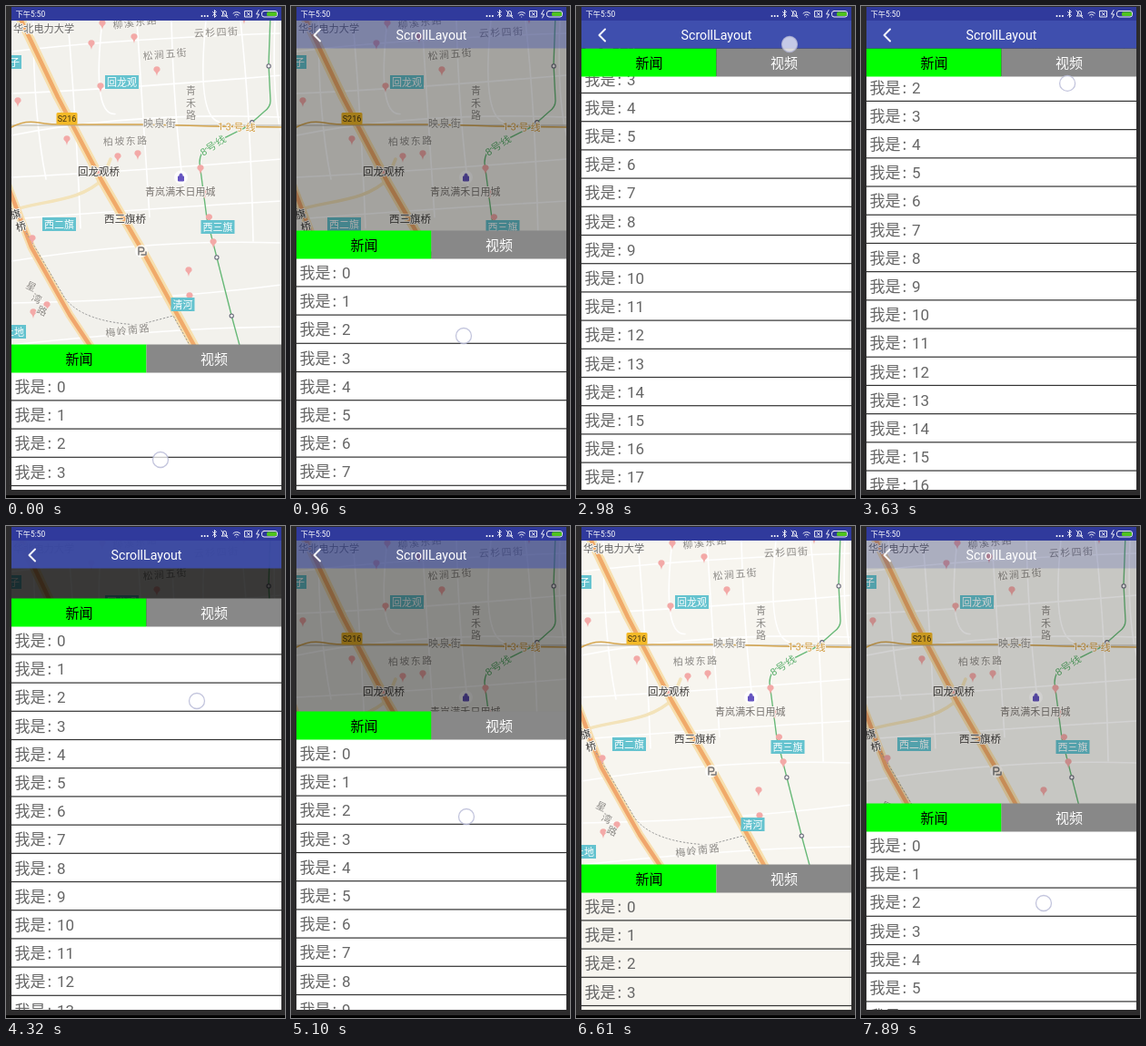
An HTML page that plays this animation: 307x540 px, repeating every 8 s.

```html
<!DOCTYPE html>
<html lang="zh-CN">
<head>
<meta charset="utf-8">
<title>ScrollLayout</title>
<style>
html, body { margin: 0; width: 100%; height: 100%; overflow: hidden; background: #2c2b2c; }
svg { display: block; position: absolute; left: 0; top: 0; }
text { font-family: Roboto, "Noto Sans CJK SC", "Noto Sans CJK", "Noto Sans", sans-serif; }
.line { fill: none; stroke-linecap: round; stroke-linejoin: round; }
.mid { text-anchor: middle; }
.street { font-size: 11px; fill: #8c8a86; letter-spacing: 1.4px; }
.place { font-size: 11.5px; fill: #3c3a38; }
.halo { paint-order: stroke; stroke: #f7f5f0; stroke-width: 2px; stroke-linejoin: round; }
.item { font-size: 17px; fill: #666; }
.colon { font-family: "Noto Sans CJK SC", "Noto Sans CJK", sans-serif; }
.tab { font-size: 15px; text-anchor: middle; }
</style>
</head>
<body>
<svg width="307" height="540" viewBox="0 0 307 540">
  <defs>
    <clipPath id="screen"><rect x="6" y="1" width="297" height="530"/></clipPath>
    <path id="pin" d="M0 5C-1-.5-3.6 0-3.6-2.2A3.6 3.6 0 0 1 3.6-2.2C3.6 0 1-.5 0 5Z" fill="#f3a9a7"/>
    <path id="highway" d="M13 8L57 100 106 193 152 272 210 378"/>
    <path id="ramp" d="M2 197L28 265 70 339 96 378"/>
  </defs>
  <rect y="537" width="307" height="3"/>
  <g clip-path="url(#screen)">
    <rect id="ground" x="6" width="297" height="531"/>
    <g class="line" id="roads" stroke="#fff" stroke-width="1.6"></g>
    <g class="line">
      <path d="M2 226C35 213 82 216 106 190L115 168" stroke="#f3e3ba" stroke-width="3.5"/>
      <use href="#ramp" stroke="#f7dfb0" stroke-width="9"/>
      <use href="#ramp" stroke="#f0a66d" stroke-width="4.5"/>
      <use href="#highway" stroke="#f7dfae" stroke-width="10"/>
      <use href="#highway" stroke="#f0aa6a" stroke-width="4.5"/>
      <path d="M6 131H303" stroke="#b5b1a8" stroke-width="1.2"/>
      <path d="M6 133Q20 125 36 128T85 130H163L225 132 303 133" stroke="#d5a650" stroke-width="1.6"/>
      <path id="metro" d="M291 8L289 64 291 104Q291 111 284 116L266 132 226 152Q213 159 213 172L221 233 249 343 258 376" stroke="#68b978" stroke-width="1.4"/>
      <path d="M6 222L29 260 65 321Q85 347 146 350L184 340 202 372" stroke="#999" stroke-width="1" stroke-dasharray="1.5 2.5"/>
    </g>
    <g id="marks"></g>
    <rect x="55.500" y="117" width="23" height="13" rx="1.500" fill="#f3b927"/>
    <text class="mid" x="67" y="127" font-size="9" fill="#443414">S216</text>
    <circle cx="192.500" cy="188" r="7.500" fill="#fff" opacity=".8"/>
    <path d="M189.500 187h6v5h-6zM191 187v-1.500a1.500 1.500 0 0 1 3 0v1.500" fill="#6554c0" stroke="#6554c0"/>
    <circle cx="149" cy="269" r="7" fill="#fff" opacity=".8"/>
    <path class="line" d="M146 273v-8h3.500a2 2 0 0 1 0 4.500H146M149 273h5v-3" stroke="#777" stroke-width="1.500"/>
    <rect id="dim" x="6" y="16" width="297" height="515"/>
    <g id="panel">
      <rect id="sheet" x="6" y="30" width="297" height="540"/>
      <g id="list"></g>
      <rect x="6" y="-.5" width="148.500" height="31" fill="#0f0"/>
      <rect x="154.500" y="-.5" width="148.500" height="31" fill="#888"/>
      <text class="tab" x="80.500" y="21">新闻</text>
      <text class="tab" x="229" y="21" fill="#fff">视频</text>
    </g>
    <rect id="bar" x="6" y="16" width="297" height="30.500" fill="#3f4fae"/>
    <g id="title">
      <path class="line" d="M32 25.500L25.500 32 32 38.500" stroke="#fff" stroke-width="1.900"/>
      <text class="mid" x="154.500" y="37" font-size="14.200" fill="#fff">ScrollLayout</text>
    </g>
    <rect x="6" y="1" width="297" height="15" fill="#303a9c"/>
    <g fill="#fff">
      <text x="10.500" y="12" font-size="8.300">下午5:50</text>
      <path class="line" d="M215.500 11h6.500" stroke="#fff" stroke-width="2" stroke-dasharray="0 3.200"/>
    </g>
    <g class="line" stroke="#fff" stroke-width=".9">
      <path d="M227.500 6.500l4 4-2 2v-8l2 2-4 4M237.500 11h6l-1-1.500V7.500a2 2 0 0 0-4 0v2zM237 5l7 8M250 8a5.500 5.500 0 0 1 7.500 0M251.500 10a3.300 3.300 0 0 1 4.500 0M253.700 12v.1M263 5.500h7.500v6.500H263zM265.300 7.300l3 3m0-3l-3 3M278 4.500l-2.500 4.500h3l-2 4"/>
      <rect x="281.500" y="5.500" width="17" height="6.500" rx="2.500"/>
    </g>
    <rect x="287" y="6.500" width="11" height="4.600" rx="1.500" fill="#4fc31e"/>
    <circle id="touch" r="8.500" fill="#fff" fill-opacity=".7" stroke="#b4b6d4" stroke-opacity=".8" stroke-width="1.300"/>
  </g>
</svg>
<script>
const NS = "http://www.w3.org/2000/svg";
const $ = id => document.getElementById(id);

function add(parent, tag, attrs, text) {
  const el = document.createElementNS(NS, tag);
  for (const k in attrs) el.setAttribute(k, attrs[k]);
  if (text !== undefined) el.textContent = text;
  return parent.appendChild(el);
}
const mark = (tag, attrs, text) => add($("marks"), tag, attrs, text);

// Side streets: a loose, gently bent grid
for (let i = 0; i < 8; i++) {
  const y = 36 + 46 * i, x = 30 + 38 * i, bend = 12 * Math.sin(i * 2.3);
  add($("roads"), "path", { d: `M6 ${y + 14}Q${120 + 8 * i} ${y + bend} 303 ${y - 6}` });
  add($("roads"), "path", { d: `M${x} 16Q${x + bend} 120 ${x + 14} ${190 + 6 * bend}` });
}

// Stations along the metro line
const metro = $("metro");
for (const part of [0.14, 0.31, 0.75, 0.91]) {
  const { x, y } = metro.getPointAtLength(part * metro.getTotalLength());
  mark("circle", { cx: x, cy: y, r: 2.1, fill: "#fff", stroke: "#667", "stroke-width": 1.1 });
}

function pins(x, y, dx, dy, n = 2) {
  for (let i = 0; i < n; i++) mark("use", { href: "#pin", x: x + dx * i, y: y + dy * i });
}
pins(106, 21, 156, -6);
pins(94, 43, 47, -7);
pins(104, 90, 62, -18);
pins(13, 106, 16, 151);
pins(67, 148, 36, 35);
pins(123, 167, 22, -3);
pins(214, 180, 4.7, 27, 4);
pins(201, 292, 1, 28);
pins(30, 338, 15, -8);

function tag(x, y, label) {
  const width = 11 * label.length + 4;
  mark("rect", { x, y, width, height: 15, fill: "#65c3cf" });
  mark("text", { x: x + width / 2, y: y + 11.5, class: "mid", "font-size": 11, fill: "#fff" }, label);
}
tag(109, 76, "回龙观");
tag(40, 232, "西二旗");
tag(214.5, 235, "西三旗");
tag(181.5, 320, "清河");
tag(-9, 54, "庄子");
tag(-4, 350, "上地");

function name(kind, x, y, label, turn = 0, style = "") {
  mark("text", { class: kind + " halo", x, y, transform: `rotate(${turn} ${x} ${y})`, style }, label);
}
function column(kind, x, y, label, dx = 0, turn = 0) {
  [...label].forEach((c, i) => name(kind, x + dx * i, y + 13.5 * i, c, turn));
}
name("place", 8, 29, "华北电力大学", 0, "font-size:11.2px;fill:#666");
name("street", 118, 25, "柳溪东路", -7);
name("street", 207, 34, "云杉四街", -3);
name("street", 151, 59, "松涧五街", -5);
name("street", 151, 133, "映泉街");
name("street", 107, 153, "柏坡东路", -2);
name("street", 110, 363, "梅岭南路", -7);
name("street", 153, 208, "青岚满禾日用城", 0, "letter-spacing:.1px;fill:#77736f");
name("place", 79, 186, "回龙观桥");
name("place", 108, 237.5, "西三旗桥");
name("street", 233, 136, "13号线", 2, "letter-spacing:2.4px;fill:#d19a3c");
name("street", 217, 165, "8号线", -33, "fill:#58ad69");
column("street", 198, 97, "青禾路");
column("street", 21, 309, "星湾路", 6, 25);
column("place", 6, 234, "旗桥", 6, -15);

// List rows
const ROW = 31.2;
for (let i = 0; i < 24; i++) {
  const y = 52 + ROW * i;
  add($("list"), "text", { class: "item", x: 9.5, y }, "我是");
  add($("list"), "text", { class: "item colon", x: 45.5, y }, ":");
  add($("list"), "text", { class: "item", x: 56, y }, i);
  add($("list"), "rect", { x: 6, y: y + 8.3, width: 297, height: 1.2, fill: "#333" });
}

// A finger drags the sheet up, then down, lets go and starts again
const LOOP = 8000, STEP = 135, FIRST = 100, OPEN = 372, TRAVEL = 325;
const REST = [6580, 7350];
const poses = [
  { t: 0, shift: 0, x: 170, y: 498 },
  { t: 930, shift: 125, x: 190, y: 362 },
  { t: 2955, shift: 431, x: 235, y: 42 },
  { t: 3240, shift: 448, x: 237, y: 23 },
  { t: 4305, shift: 292, x: 210, y: 192 },
  { t: 5115, shift: 168, x: 193, y: 319 },
  { t: 6140, shift: 0, x: 177, y: 488 },
  { t: 7350, shift: 0, x: 189, y: 490 },
  { t: 7815, shift: 67, x: 201, y: 414 },
];

const snap = t => Math.max(0, FIRST + 20 + STEP * Math.floor((t - FIRST) / STEP));

function poseAt(t) {
  const i = poses.findIndex(p => p.t > t);
  if (i < 0) return poses[poses.length - 1];
  const a = poses[i - 1], b = poses[i], f = (t - a.t) / (b.t - a.t);
  const mix = k => a[k] + (b[k] - a[k]) * f;
  return { shift: mix("shift"), x: mix("x"), y: mix("y") };
}

const set = (id, key, value) => $(id).setAttribute(key, value);
const move = (id, x, y) => set(id, "transform", `translate(${x} ${y})`);

function draw(now) {
  const t = now % LOOP;
  const { shift, x, y } = poseAt(snap(t));
  const p = Math.min(1, shift / TRAVEL);
  const idle = t >= REST[0] && t < REST[1];
  set("dim", "opacity", 0.85 * p);
  set("bar", "opacity", p);
  set("title", "opacity", p > 0.01 ? 1 : 0);
  move("panel", 0, OPEN - p * TRAVEL);
  move("list", 0, -Math.max(0, shift - TRAVEL));
  move("touch", x, y);
  set("touch", "opacity", idle ? 0 : 1);
  set("ground", "fill", idle ? "#f7f5ef" : "#f2f1ec");
  set("sheet", "fill", idle ? "#f7f5ef" : "#fff");
}

const start = performance.now();
function tick() {
  draw(performance.now() - start);
  requestAnimationFrame(tick);
}
tick();
</script>
</body>
</html>
```
